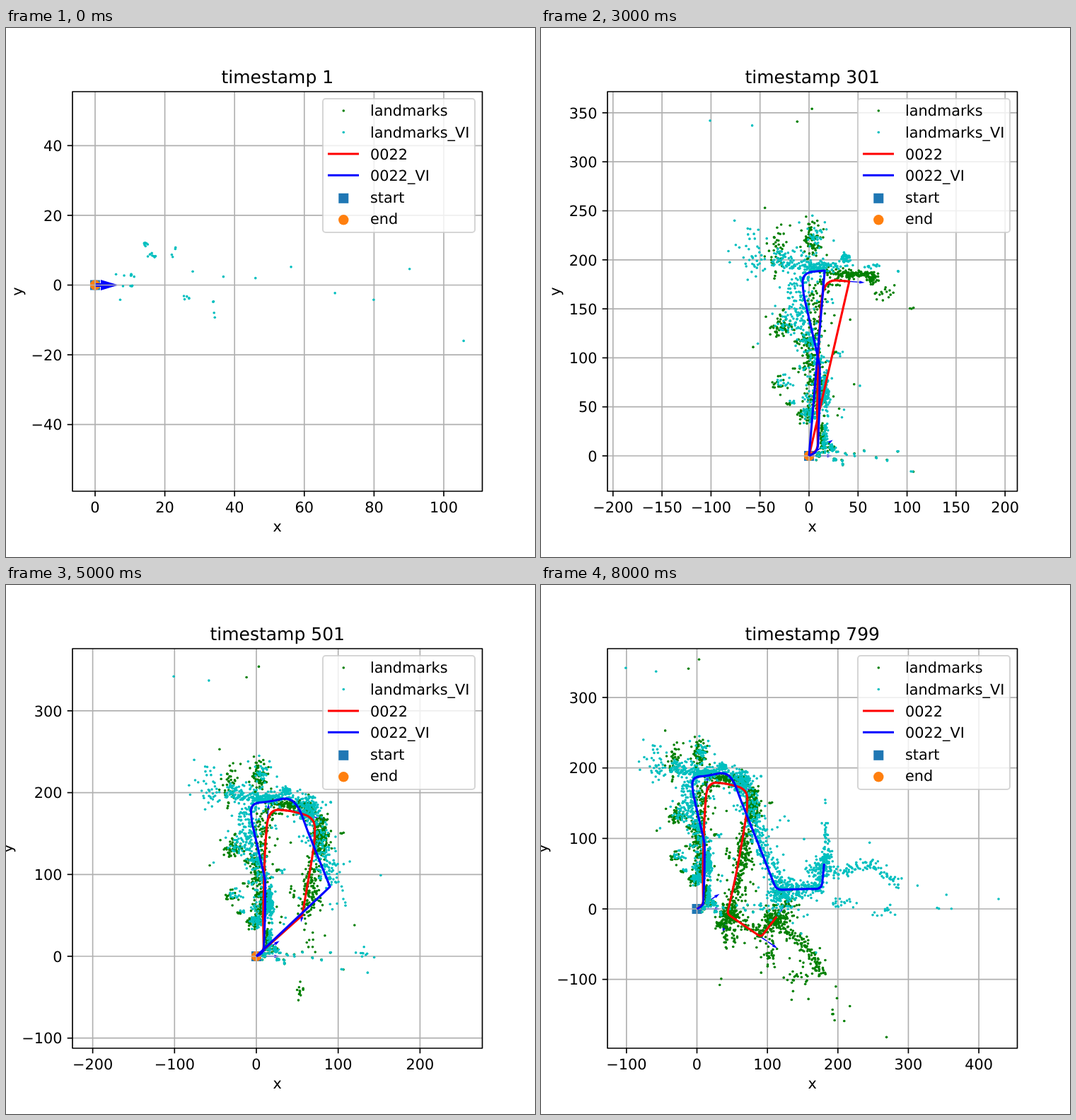
Animation, 748 px wide and 748 px high, one loop 9000 ms. Source, as an HTML page with a canvas:

```html
<!DOCTYPE html>
<html lang="en">
<head>
<meta charset="utf-8">
<style>
  html, body { margin: 0; width: 100%; height: 100%; overflow: hidden; background: #fff; }
  canvas { display: block; }
</style>
</head>
<body>
<canvas id="plot" width="748" height="748"></canvas>
<script>
const ctx = document.getElementById('plot').getContext('2d');
const FONT = '"DejaVu Sans", sans-serif';
const box = { l: 94, t: 90, r: 673.5, b: 655 };
const midX = (box.l + box.r) / 2, midY = (box.t + box.b) / 2;
const GREEN = '#008000', CYAN = '#00bfbf', RED = '#f00', BLUE = '#00f', ORANGE = '#ff7f0e';
const LAST = 8;

// Per step: pixel of the origin and pixels per unit
const views = [
  [126, 363.5, 4.93], [336.4, 595, 1.964], [380.4, 605, 1.386], [379, 605, 1.386], [352, 551.7, 1.233],
  [354, 525, 1.157], [346, 505, 1.1015], [285, 484, 1.04], [220.5, 458, 0.9965]
];

// Path corners: step reached, x, y, rounding
const redPath = [
  [0, 0, 0, 0], [1, 9, 6, 7], [1, 8.3, 47, 0], [2, 10, 125, 30], [3, 14.5, 180, 22], [3, 41, 178, 8],
  [4, 71.5, 170, 18], [4, 71.5, 143, 12], [4, 68, 119, 12], [5, 56, 50, 20], [6, 43, -7, 5],
  [7, 91, -40, 5], [8, 113, -11, 0]
];
const bluePath = [
  [0, 0, 0, 0], [1, 9, 5, 7], [1, 10.5, 47, 0], [2, 11, 92, 4], [2, 7, 110, 0], [3, -6, 166, 8],
  [3, -7, 187, 16], [3, 16, 189, 6], [4, 40, 194.5, 14], [4, 52, 182, 10], [4, 63.3, 151.5, 0],
  [5, 90, 85, 0], [6, 112.7, 27, 8], [7, 158, 28.5, 10], [8, 177, 28, 9], [8, 180.5, 64, 0]
];

let seed = 22;
const rnd = () => (seed = (seed * 16807) % 2147483647) / 2147483647;
const gauss = () => (rnd() + rnd() + rnd() - 1.5) * 2;

const green = [], cyan = [];

// Clusters: step, x, y, spread in x and y, count
function blobs(list, rows) {
  for (const [step, x, y, sx = 0, sy = sx, n = 1] of rows)
    for (let i = 0; i < n; i++) list.push([step, x + gauss() * sx, y + gauss() * sy]);
}
// Landmarks along a path, shifted to its left, a few of them far off
function along(list, path, shift, spread, density) {
  for (let i = 1; i < path.length; i++) {
    const [, x, y] = path[i - 1], [step, x2, y2] = path[i];
    const len = Math.hypot(x2 - x, y2 - y);
    for (let n = len * density; n > 0; n--) {
      const u = rnd(), off = (shift + gauss() * spread * (rnd() < .06 ? 3 : 1)) / len;
      list.push([step, x + (x2 - x) * u - (y2 - y) * off, y + (y2 - y) * u + (x2 - x) * off]);
    }
  }
}

// First sighting, later found by both runs
blobs(cyan, [
  [0, 14.4, 12, .4, .4, 7], [0, 15.9, 8.7, .6, .5, 7], [0, 22.2, 8.3, .3, .2, 2], [0, 23, 10.5, .3, .3, 2],
  [0, 10, 2.8, .6, .2, 7], [0, 9.5, -.2, 2, .2, 4], [0, 26, -3.8, .5, .5, 5], [0, 34, -4.5, .4, 3, 4],
  [0, 28, 3.9], [0, 36.8, 2.4], [0, 46, 2], [0, 56.2, 5.2], [0, 68.8, -2.3], [0, 79.9, -4.2],
  [0, 90.2, 4.6], [0, 105.7, -16], [0, 7.2, -4.2], [0, 6, 3.1]
]);
for (const [, x, y] of [...cyan]) {
  green.push([1, x + gauss() * .4, y + gauss() * .4]);
  if (x > 20) cyan.push([1, x + gauss(), y + gauss()]);
}

// Seen by both runs, the second with a drift
const shared = green.length;
blobs(green, [
  [1, -3, 244], [1, 1, 221, 2.8, 3, 11], [1, -33, 131, 5, 4, 18], [1, -19, 134, 3, 3, 6], [1, -3, 117, 5, 5, 26],
  [1, 3, 95, 4, 6, 12], [1, -31, 74, 4, 4, 14], [1, -21, 53, 1.5, 1, 5], [1, -2, 43, 4, 4, 55],
  [1, 4, 60, 2, 7, 24], [1, 12, 65, 2, 8, 70], [1, 14, 20, 1.2, 8, 45], [1, 20, 8, 3, 2, 16],
  [1, 15, 159, 2, 1, 3], [1, -26, 149, 1, .5, 3], [1, -12, 88, 2, 1, 4], [1, 27, 105, 2, .7, 4],
  [1, -57, 111], [1, -44, 142], [1, 46, 73], [1, 30, 45, 1, 6, 2]
]);
for (const [step, x, y] of green.slice(shared)) {
  const up = Math.max(y, 0);
  cyan.push([step, x + 8 * up / (up + 40) + gauss() * .6, y - .06 * x + .5 + gauss() * .6]);
}

along(green, redPath.slice(2), 4, 5, 1.25);
blobs(green, [
  [2, 3, 354], [2, -12, 341], [2, -45, 253], [2, 4, 220, 6, 11, 65], [2, -32, 210, 5, 12, 42],
  [2, -27, 131, 7, 5, 26], [2, 2, 110, 6, 15, 45], [3, 42, 185, 11, 1.8, 100], [3, 64, 180, 3, 3, 50],
  [3, 78, 166, 6, 5, 15], [3, 106, 150, 1.5, .6, 3]
]);
blobs(green, [
  [4, 80, 145, 5, 12, 100], [4, 68, 80, 6, 15, 50], [4, 65, 20, 8, 10, 10], [4, 53, -40, 2, 9, 11],
  [4, 120, 38], [5, 44, 75, 3, 6, 5], [6, 43, -13, 7, 9, 130], [6, 33, -22, 2, 2, 25],
  [6, 41, -42, 1.5, 8, 14], [6, 33, -95, 1, 15, 2]
]);
along(green, [[7, 118, -25], [8, 155, -53], [8, 178, -95]], 0, 4.5, 1.3);
blobs(green, [
  [7, 112, -15, 8, 8, 120], [7, 101, -58, 7, 13, 34], [8, 129, 10, 8, 10, 50], [8, 142, -97, 11, 6, 20],
  [8, 143, -121, 9, 5, 3], [8, 195, -125, 4, 18, 6], [8, 217, -138], [8, 209, -159], [8, 269, -182]
]);

along(cyan, bluePath.slice(2), 4, 6, 1.3);
blobs(cyan, [
  [2, -101, 342], [2, -58, 337], [2, -76, 240], [2, -82, 202, .5, 3, 2], [2, -12, 150, 9, 20, 60],
  [3, -56, 205, 7, 13, 36], [3, -26, 200, 9, 6, 60], [3, 10, 193, 14, 2.5, 110], [3, 37, 203, 2.5, 3, 45],
  [3, 7, 222, 7, 9, 26], [3, 63, 193, 4, 1.5, 12], [3, 90, 189, 1.5, 1, 3], [2, 17, 65, 1.5, 10, 40]
]);
blobs(cyan, [
  [4, 65, 180, 7, 6, 100], [4, 82, 145, 6, 16, 36], [4, 100, 108, 6, 12, 14], [4, 104, 62, 8, 6, 6],
  [4, 128, 0, 6, 7, 9], [4, 136, -20], [4, 152, 99], [6, 118, 22, 8, 10, 130], [6, 85, 3, 10, 4, 10],
  [6, 148, -35], [6, 169, -62]
]);
along(cyan, [[8, 183, 45], [8, 183, 95], [8, 184, 122]], 0, 3.5, .7);
along(cyan, [[8, 190, 50], [8, 243, 64], [8, 290, 34]], 0, 5, .9);
blobs(cyan, [
  [7, 145, 24, 18, 7, 70], [7, 162, 55, 8, 6, 14], [7, 127, 129, 5, 6, 3], [7, 182, 64, 6, 9, 70],
  [8, 207, 10, 9, 5, 18], [8, 262, -6, 10, 6, 13], [8, 183, 154, .5, 3, 2], [8, 347, 0, 8, 1, 3],
  [8, 354, 20], [8, 428, 14], [8, 245, 94], [8, 313, 33]
]);

function text(str, x, y, align = 'left', size = 20.83) {
  ctx.font = `${size}px ${FONT}`;
  ctx.textRendering = 'geometricPrecision';
  ctx.textAlign = align;
  ctx.fillStyle = '#000';
  ctx.fillText(str, x, y);
}
function stroke(color, width) {
  ctx.strokeStyle = color;
  ctx.lineWidth = width;
  ctx.stroke();
}
function line(x, y, x2, y2, color, width) {
  ctx.beginPath();
  ctx.moveTo(x, y);
  ctx.lineTo(x2, y2);
  stroke(color, width);
}
function disc(x, y, r, color) {
  ctx.fillStyle = color;
  ctx.beginPath();
  ctx.arc(x, y, r, 0, 7);
  ctx.fill();
}
function square(x, y) {
  ctx.fillStyle = '#1f77b4';
  ctx.fillRect(x - 7, y - 7, 14, 14);
}
function arrow(x, y, angle, w) {
  const len = 33, neck = len - 5 * w;
  ctx.save();
  ctx.translate(x, y);
  ctx.rotate(angle);
  ctx.fillStyle = BLUE;
  ctx.fillRect(0, -w / 2, neck, w);
  ctx.beginPath();
  ctx.moveTo(neck, -1.5 * w);
  ctx.lineTo(len, 0);
  ctx.lineTo(neck, 1.5 * w);
  ctx.fill();
  ctx.restore();
}
const label = v => String(v).replace('-', '\u2212');
function ticks(lo, hi, gap) {
  const out = [];
  for (let v = Math.ceil(lo / gap) * gap; v <= hi; v += gap) out.push(v);
  return out;
}
// Point at distance d from p towards q, at most halfway
function toward(p, q, d) {
  const u = Math.min(.5, d / Math.hypot(q[1] - p[1], q[2] - p[2]));
  return [0, p[1] + (q[1] - p[1]) * u, p[2] + (q[2] - p[2]) * u];
}

function legend() {
  ctx.beginPath();
  ctx.roundRect(448, 100, 215, 189, 4);
  ctx.fillStyle = 'rgba(255,255,255,.8)';
  ctx.fill();
  stroke('rgba(204,204,204,.8)', 2.08);
  disc(477.3, 117, 1.8, GREEN);
  disc(477.3, 147.5, 1.8, CYAN);
  line(455, 178, 499, 178, RED, 3.1);
  line(455, 208.3, 499, 208.3, BLUE, 3.1);
  square(477.3, 240.8);
  disc(477.3, 271.3, 7.2, ORANGE);
  ['landmarks', 'landmarks_VI', '0022', '0022_VI', 'start', 'end']
    .forEach((s, i) => text(s, 515, 124.4 + i * 30.55));
}

function draw(step) {
  const [ox, oy, scale] = views[step];
  const gap = step < 1 ? 20 : step < 4 ? 50 : 100;
  const map = ([, x, y]) => [ox + x * scale, oy - y * scale];
  const xs = ticks((box.l - ox) / scale, (box.r - ox) / scale, gap);
  const ys = ticks((oy - box.b) / scale, (oy - box.t) / scale, gap);
  const seen = list => list.filter(p => p[0] <= step);

  function route(path, color) {
    const keys = seen(path);
    ctx.beginPath();
    ctx.moveTo(ox, oy);
    keys.forEach((p, i) => {
      const next = keys[i + 1];
      if (!i) return;
      if (!next) return ctx.lineTo(...map(p));
      ctx.lineTo(...map(toward(p, keys[i - 1], p[3])));
      ctx.quadraticCurveTo(...map(p), ...map(toward(p, next, p[3])));
    });
    if (step < LAST) ctx.lineTo(ox, oy);
    stroke(color, 3.1);
  }

  ctx.fillStyle = '#fff';
  ctx.fillRect(0, 0, 748, 748);
  ctx.lineJoin = 'round';

  ctx.save();
  ctx.beginPath();
  ctx.rect(box.l, box.t, box.r - box.l, box.b - box.t);
  ctx.clip();
  square(ox, oy);
  if (step < LAST) disc(ox, oy, 7.2, ORANGE);
  // Headings where the path enters each corner
  seen(redPath).forEach((p, i) => {
    const prev = redPath[i - 1] || [0, -1, 0];
    arrow(...map(toward(p, prev, p[3])), Math.atan2(prev[2] - p[2], p[1] - prev[1]), step ? 1.5 : 5);
  });
  for (const v of xs) line(ox + v * scale, box.t, ox + v * scale, box.b, '#b0b0b0', 1.67);
  for (const v of ys) line(box.l, oy - v * scale, box.r, oy - v * scale, '#b0b0b0', 1.67);
  for (const p of seen(green)) disc(...map(p), 1.8, GREEN);
  for (const p of seen(cyan)) disc(...map(p), 1.8, CYAN);
  if (step) {
    route(redPath, RED);
    route(bluePath, BLUE);
  }
  ctx.restore();

  ctx.beginPath();
  ctx.rect(box.l, box.t, box.r - box.l, box.b - box.t);
  stroke('#000', 1.67);
  for (const v of xs) {
    const x = ox + v * scale;
    line(x, box.b, x, box.b + 7.3, '#000', 1.67);
    text(label(v), x, 684.5, 'center');
  }
  let widest = 0;
  for (const v of ys) {
    const y = oy - v * scale;
    line(box.l - 7.3, y, box.l, y, '#000', 1.67);
    text(label(v), 79.4, y + 7.7, 'right');
    widest = Math.max(widest, ctx.measureText(label(v)).width);
  }
  text('x', midX, 712, 'center');
  ctx.save();
  ctx.translate(66.5 - widest, midY + 10 - 10);
  ctx.rotate(-Math.PI / 2);
  text('y', 0, 0, 'center');
  ctx.restore();
  text('timestamp ' + Math.min(step * 100 + 1, 799), midX, 77.5, 'center', 25);
  legend();
}

let shown = -1;
function tick() {
  const step = Math.floor(performance.now() / 1000) % (LAST + 1);
  if (step !== shown) draw(shown = step);
  requestAnimationFrame(tick);
}
tick();
</script>
</body>
</html>
```
